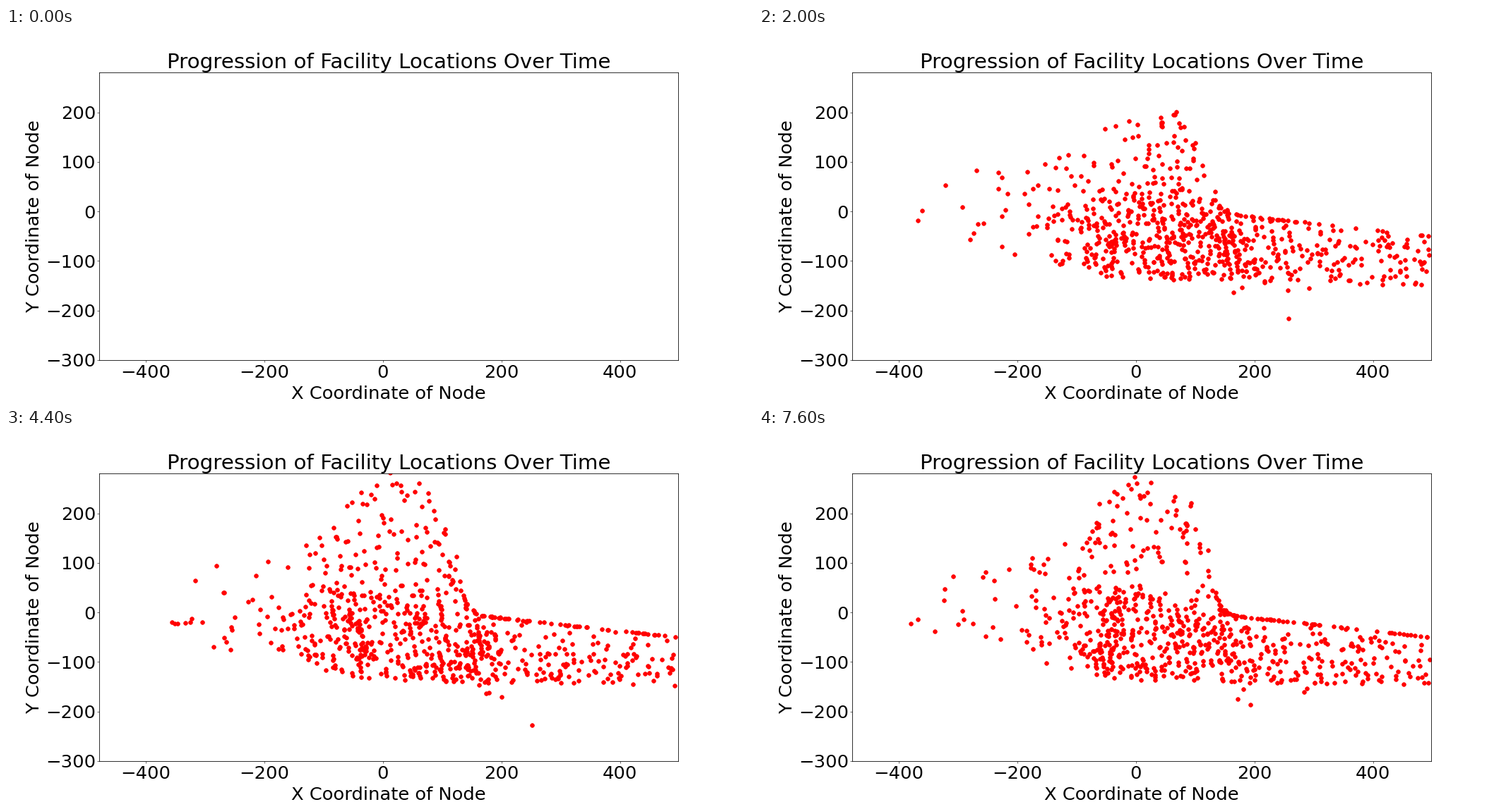
These frames come from a looping animation (1058x529 px, 8 s). A matplotlib script:

```python
import numpy as np
import matplotlib.pyplot as plt
from matplotlib.animation import FuncAnimation

DPI = 52.9
STEP, LOOP = 200, 8000

# Moments (ms) at which a new layout replaces the last one
CHANGES = [200, 400, 600, 1400, 1600, 2000, 2400, 2800, 3600,
           4000, 4200, 4400, 6400, 6600, 7600]


def lerp(a, b, p):
    return a + (b - a) * p


def spread(t):
    """How far the town has grown at time t, from 0 to 1."""
    if t == CHANGES[0]:
        return 1.0
    return min(1.0, (t - 400) / 3000)


def floor(x):
    return -138 + 0.25 * np.maximum(0, -x - 20) - 0.025 * np.maximum(0, x)


def roof(x, height):
    """Upper edge: a town of the given height falling off to the east band."""
    east = -5 - 0.13 * np.maximum(0, x - 150)
    return east + (height - east) / (1 + np.exp((x - 125) / 9))


def pick_x(rng, p):
    core = rng.normal(lerp(75, 45, p), lerp(62, 85, p), int(lerp(420, 440, p)))
    east = 140 + 355 * rng.random(225) ** 1.4
    west = -30 - rng.exponential(lerp(75, 95, p), int(lerp(85, 140, p)))
    x = np.concatenate([core, east, west])
    return x[x > -330 - 120 * p]


def layout(rng, p):
    x = pick_x(rng, p)
    n = len(x)
    low, top = floor(x), roof(x, 65)
    y = low + (top - low) * rng.beta(1.15, 1.45, n)

    # A thin share lies above the core, under a central peak
    peak = np.exp(-((x - 20) / 120) ** 2)
    crown = roof(x, 65 + 35 * p + lerp(80, 185, p) * peak)
    above = rng.random(n) < lerp(0.06, 0.22, p)
    y = np.where(above, rng.uniform(top, crown), y)

    # Many facilities line up along slightly tilted streets
    street = np.rint((x + 0.15 * y) / 14) * 14 - 0.15 * y + rng.normal(0, 1.2, n)
    x = np.where((rng.random(n) < 0.55) & (np.abs(x - 80) < 240), street, x)

    south = rng.uniform(150, 300, 5), -145 - rng.exponential(22, 5)
    return np.vstack([np.column_stack([x, y]), np.column_stack(south)])


rng = np.random.default_rng(7)
TIMES = [0] + CHANGES
CLOUDS = [np.empty((0, 2))] + [layout(rng, spread(t)) for t in CHANGES]

plt.rcParams["axes.linewidth"] = 1.1
fig, ax = plt.subplots(figsize=(1058 / DPI, 529 / DPI), dpi=DPI)
fig.subplots_adjust(left=0.125, right=0.9, bottom=0.11, top=0.88)
ax.set_xlim(-478, 498)
ax.set_ylim(-300, 280)
ax.set_xticks(range(-400, 401, 200))
ax.set_yticks(range(-300, 201, 100))
ax.tick_params(labelsize=35)
ax.tick_params(axis="x", pad=4.5)
ax.set_title("Progression of Facility Locations Over Time", fontsize=40)
ax.set_xlabel("X Coordinate of Node", fontsize=35, labelpad=8)
ax.set_ylabel("Y Coordinate of Node", fontsize=35, labelpad=5)
dots = ax.scatter([], [], s=60, color="red")


def update(i):
    k = np.searchsorted(TIMES, i * STEP, side="right") - 1
    dots.set_offsets(CLOUDS[k])
    return (dots,)


anim = FuncAnimation(fig, update, frames=LOOP // STEP, interval=STEP,
                     repeat=True, repeat_delay=0)
plt.show()
```
